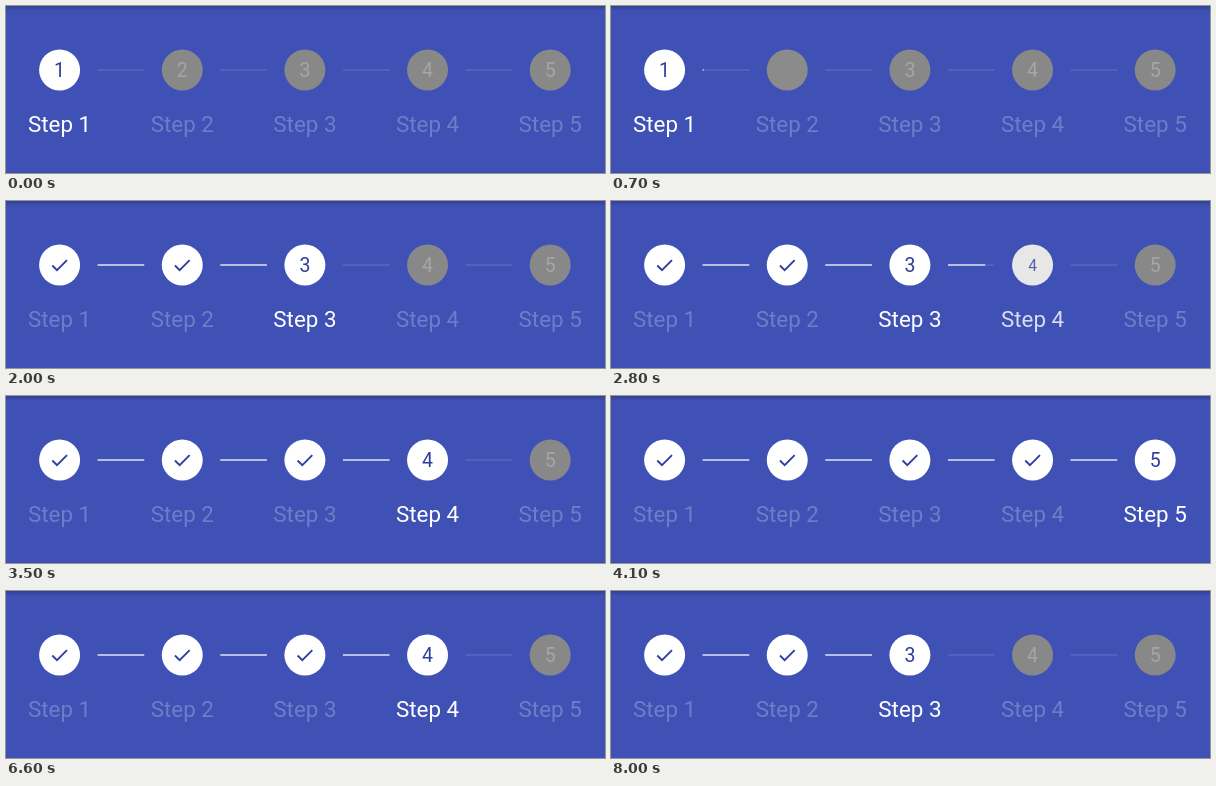
Write an HTML page that moves like this. It is 599x167 px and loops after 8100 ms.

```html
<!DOCTYPE html>
<html lang="en">
<head>
<meta charset="utf-8">
<title>Stepper</title>
<style>
  html, body { margin: 0; width: 100%; height: 100%; overflow: hidden; background: #3f51b5; }
  svg { display: block; width: 100%; height: 100%; }
  text { font-family: Roboto, sans-serif; text-anchor: middle; }
</style>
</head>
<body>
<svg viewBox="0 0 599 167">
  <defs>
    <linearGradient id="shadow" x2="0" y2="1">
      <stop offset="0" stop-opacity=".2"/>
      <stop offset="1" stop-opacity="0"/>
    </linearGradient>
  </defs>
  <rect width="599" height="5" fill="url(#shadow)"/>
  <g id="stepper"></g>
</svg>
<script>
const LOOP = 8100, TICK = 100, DURATION = 200, DONE_AT = 4750;
const COUNT = 5, FIRST_X = 53.6, SPACING = 122.65, MID_Y = 64, RADIUS = 20.5;
const INK = '#303f9f', FAINT = 0.25, NUMBER_SIZE = 19.5;

// Start time of each transition and the step it leads to, counted from zero.
const MOVES = [[680, 1], [1680, 2], [2659, 3], [3650, 4], [6350, 3], [7650, 2]];

const stepper = document.getElementById('stepper');
const ease = p => 0.5 - Math.cos(Math.PI * p) / 2;
const stepX = i => FIRST_X + i * SPACING;

function stateAt(time) {
  let current = 0, next = null, f = 0;
  for (const [start, target] of MOVES) {
    if (time >= start + DURATION) current = target;
    else if (time > start) {
      next = target;
      f = ease((time - start) / DURATION);
    }
  }
  const finished = time >= DONE_AT && time <= MOVES[4][0];
  return { current, next, f, finished };
}

const line = (x1, x2, alpha) =>
  `<path d="M${x1} ${MID_Y}H${x2}" stroke="#fff" stroke-width="1.3" stroke-opacity="${alpha}"/>`;

const circle = (x, white) => {
  const shade = Math.round(136 + 119 * white);
  return `<circle cx="${x}" cy="${MID_Y}" r="${RADIUS}" fill="rgb(${shade},${shade},${shade})"/>`;
};

const number = (x, i, color, alpha = 1, scale = 1) => {
  const size = NUMBER_SIZE * scale;
  return `<text x="${x}" y="${MID_Y + size * 0.356}" font-size="${size}" fill="${color}" fill-opacity="${alpha}">${i + 1}</text>`;
};

const check = x =>
  `<path d="M${x - 7.3} ${MID_Y + 0.5}l4.7 4.7 10-10" fill="none" stroke="${INK}" stroke-width="1.9"/>`;

const label = (x, i, alpha) =>
  `<text x="${x}" y="125.5" font-size="22.4" fill="#fff" fill-opacity="${Math.max(FAINT, alpha)}">Step ${i + 1}</text>`;

function drawStep(i, { current, next, f, finished }) {
  const x = stepX(i);
  const backward = next !== null && next < current;
  if (i < current || finished) {
    return circle(x, 1) + check(x) + label(x, i, i === next ? f : 0);
  }
  if (i === current) {
    const white = backward ? 1 - f : 1;
    return circle(x, white) + number(x, i, INK) + label(x, i, white);
  }
  if (i === next) {
    return circle(x, f) + number(x, i, INK, f, f) + label(x, i, f);
  }
  return circle(x, 0) + number(x, i, '#fff', FAINT) + label(x, i, 0);
}

function drawLink(i, { current, next, f }) {
  const from = stepX(i) + 38, to = stepX(i + 1) - 38;
  let filled = i < current ? 1 : 0;
  if (next > current && i === current) filled = f;
  if (next !== null && next < current && i === next) filled = 1 - f;
  const split = from + (to - from) * filled;
  return (filled > 0 ? line(from, split, 0.85) : '') +
         (filled < 1 ? line(split, to, 0.13) : '');
}

let shown = -1;
function render(now) {
  const time = Math.floor(now % LOOP / TICK) * TICK;
  if (time !== shown) {
    shown = time;
    const state = stateAt(time);
    let markup = '';
    for (let i = 0; i < COUNT; i++) {
      markup += drawStep(i, state);
      if (i < COUNT - 1) markup += drawLink(i, state);
    }
    stepper.innerHTML = markup;
  }
}

const begin = performance.now();
function frame() {
  render(performance.now() - begin);
  requestAnimationFrame(frame);
}
frame();
</script>
</body>
</html>
```
